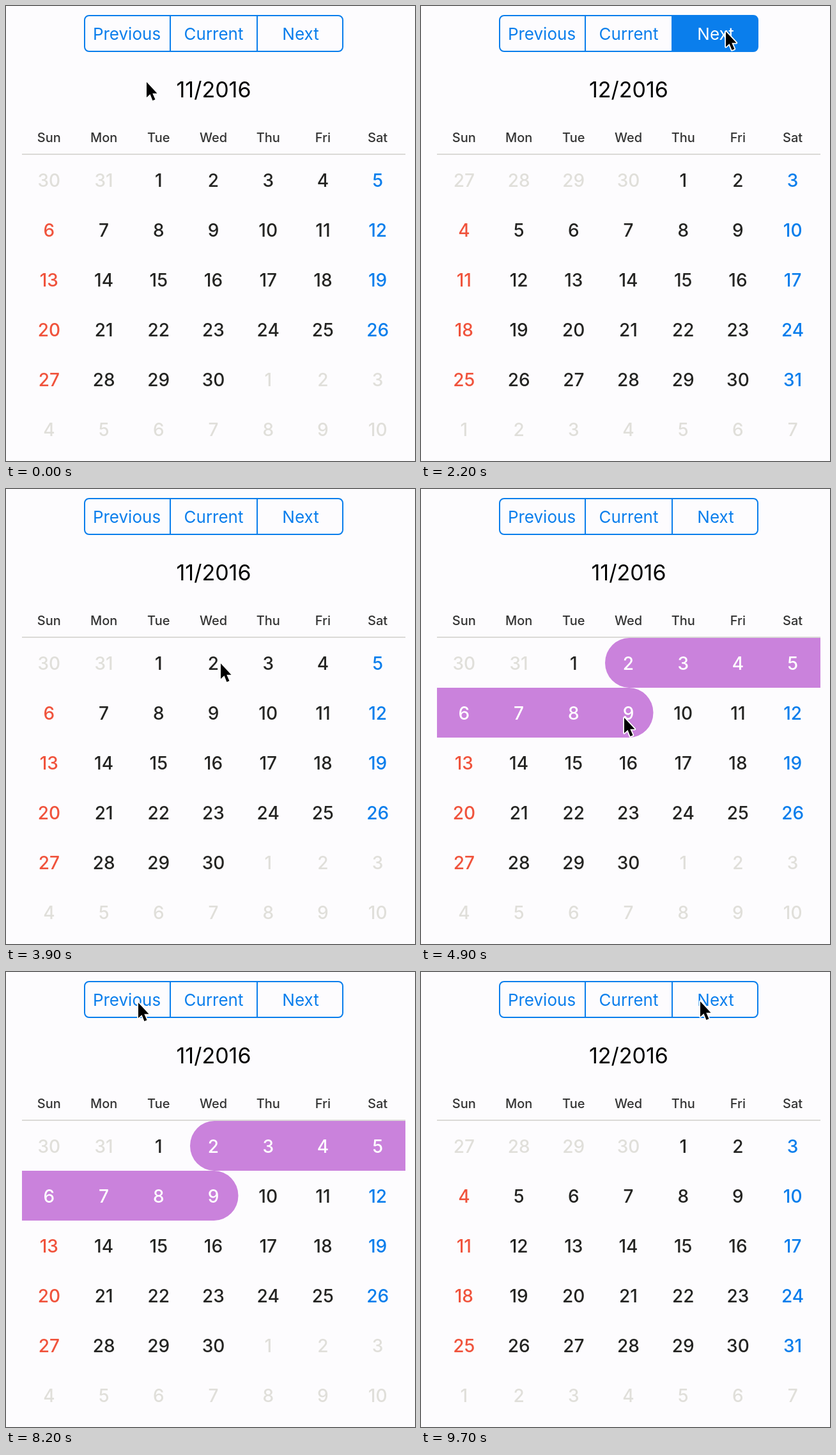
These frames come from a looping animation (640 by 712 pixels, 9.8 s). An HTML page:

```html
<!DOCTYPE html>
<html lang="en">
<head>
<meta charset="utf-8">
<title>Calendar</title>
<style>
html, body { margin: 0; width: 100%; height: 100%; overflow: hidden; background: #fdfcfe; }
svg { display: block; width: 640px; height: 712px; }
text { font-family: Inter, Roboto, sans-serif; text-anchor: middle; }
.button { font-size: 26px; }
.title { font-size: 34px; }
.week { font-size: 20px; font-weight: 500; fill: #333; }
.day { font-size: 28px; font-weight: 500; }
</style>
</head>
<body>
<svg id="stage" viewBox="0 0 640 712"></svg>
<script>
const LOOP = 9800, STEP = 100, HOLD = 200, DAY = 864e5;
const LEFT = 25, TOP = 233, CELL_W = 600 / 7, CELL_H = 78, HOME = 10;
const BLUE = '#0a7eec', RED = '#f0533c', INK = '#242422', FAINT = '#e0dfda', PAPER = '#fdfcfe';
const stage = document.getElementById('stage');

function add(tag, attrs, parent = stage, label) {
  const el = document.createElementNS('http://www.w3.org/2000/svg', tag);
  for (const key in attrs) el.setAttribute(key, attrs[key]);
  if (label) el.textContent = label;
  parent.append(el);
  return el;
}
const colX = i => LEFT + CELL_W * (i % 7 + 0.5) - 0.5;
const row = i => Math.floor(i / 7);

// Segmented control
const edges = [123, 257, 393, 527];
const frame = { x: 123, y: 15, width: 404, height: 56, rx: 7 };
add('rect', frame, add('clipPath', { id: 'round' }));
const bar = add('g', { 'clip-path': 'url(#round)' });
const fills = [0, 1, 2].map(i =>
  add('rect', { x: edges[i], y: 15, width: edges[i + 1] - edges[i], height: 56 }, bar));
const outline = { fill: 'none', stroke: BLUE, 'stroke-width': 2 };
add('rect', { ...frame, ...outline });
add('path', { d: 'M257 15V71M393 15V71', ...outline });
const labels = ['Previous', 'Current', 'Next'].map((name, i) =>
  add('text', { class: 'button', x: 189 + 136 * i, y: 52.5 }, stage, name));

const title = add('text', { class: 'title', x: 325, y: 143 });
['Sun', 'Mon', 'Tue', 'Wed', 'Thu', 'Fri', 'Sat'].forEach((name, i) =>
  add('text', { class: 'week', x: colX(i), y: 213 }, stage, name));
add('rect', { x: LEFT, y: 231, width: 600, height: 2, fill: '#dbdad7' });

const band = add('path', { fill: '#ca82dc' });
const days = Array.from({ length: 42 }, (_, i) =>
  add('text', { class: 'day', x: colX(i), y: 282.5 + CELL_H * row(i) }));

const cursor = add('path', {
  d: 'M1 2V26L6.5 21L10.5 31L14.5 29.3L10.3 19.8H17.5Z',
  fill: '#000', stroke: '#fff', 'stroke-width': 3.5, 'stroke-linejoin': 'round', 'paint-order': 'stroke'
});

// Mouse presses; what each one does follows from where it lands
const clicks = [
  [600, 203, 44], [1200, 470, 40], [1600, 474, 38], [2100, 476, 38], [3100, 325, 44],
  [3900, 335, 271], [4700, 317, 356], [5200, 407, 356], [5800, 402, 281], [6600, 313, 288],
  [7300, 318, 356], [8200, 206, 46], [9000, 440, 42], [9400, 436, 44]
].map(([at, x, y]) => ({ at, x, y }));
const START = { at: -HOLD, x: 219, y: 117 };

const buttonAt = ({ x, y }) => y > 72 ? -1 : edges.findIndex((e, i) => x >= e && x < edges[i + 1]);
const cellAt = ({ x, y }) => Math.floor((y - TOP) / CELL_H) * 7 + Math.floor((x - LEFT) / CELL_W);

function gridStart(month) {
  const first = new Date(Date.UTC(2016, month, 1));
  return first - first.getUTCDay() * DAY;
}

// Month shown and dates picked once every click released by t has taken effect
function stateAt(t) {
  let month = HOME, picked = [];
  for (const click of clicks.filter(c => c.at + HOLD <= t)) {
    const button = buttonAt(click);
    if (button >= 0) month = button === 1 ? HOME : month + button - 1;
    else {
      const date = gridStart(month) + cellAt(click) * DAY;
      picked = picked.length === 1 ? [picked[0], date].sort((a, b) => a - b) : [date];
    }
  }
  return { month, picked };
}

function cursorAt(t) {
  const i = clicks.findIndex(c => c.at > t);
  const to = i < 0 ? clicks[clicks.length - 1] : clicks[i];
  const from = i < 0 ? to : clicks[i - 1] || START;
  const left = from.at + HOLD;
  const u = to === from ? 1 : Math.max(0, (t - left) / (to.at - left));
  const k = u * u * (3 - 2 * u), dx = to.x - from.x;
  const bow = 0.13 * Math.abs(dx) * Math.sin(Math.PI * k);
  return [from.x + dx * k, from.y + (to.y - from.y) * k - bow];
}

// One piece of the selection per cell, rounded at either end of the range
function cellShape(i, isStart, isEnd) {
  const x = LEFT + CELL_W * (i % 7), y = TOP + CELL_H * row(i);
  const mid = x + CELL_W / 2;
  const a = isStart ? mid + 1 : x, b = isEnd ? mid + 0.5 : x + CELL_W + (i % 7 < 6 ? 0.5 : 0);
  const side = (round, dy) => round ? `a38 39 0 0 1 0 ${dy}` : `v${dy}`;
  return `M${a} ${y}H${b}${side(isEnd, CELL_H)}H${a}${side(isStart, -CELL_H)}Z`;
}

function drawDays({ month, picked }) {
  const first = new Date(Date.UTC(2016, month, 1)), shown = first.getUTCMonth();
  title.textContent = String(shown + 1).padStart(2, '0') + '/' + first.getUTCFullYear();
  const start = picked[0], end = picked[picked.length - 1];
  let shape = '';
  days.forEach((el, i) => {
    const time = gridStart(month) + i * DAY, date = new Date(time);
    const on = time >= start && time <= end;
    if (on) shape += cellShape(i, time === start, time === end);
    el.textContent = date.getUTCDate();
    el.setAttribute('fill', on ? '#fff'
      : date.getUTCMonth() !== shown ? FAINT
      : i % 7 === 0 ? RED : i % 7 === 6 ? BLUE : INK);
  });
  band.setAttribute('d', shape);
}

function draw(now) {
  const t = Math.floor(now % LOOP / STEP) * STEP;
  drawDays(stateAt(t));
  const press = clicks.find(c => t > c.at && t < c.at + HOLD);
  const held = press ? buttonAt(press) : -1;
  fills.forEach((el, i) => {
    el.setAttribute('fill', i === held ? BLUE : PAPER);
    labels[i].setAttribute('fill', i === held ? '#fff' : BLUE);
  });
  cursor.setAttribute('transform', `translate(${cursorAt(t)})`);
}

let origin;
function tick(now) {
  origin ??= now;
  draw(now - origin);
  requestAnimationFrame(tick);
}
draw(0);
requestAnimationFrame(tick);
</script>
</body>
</html>
```
